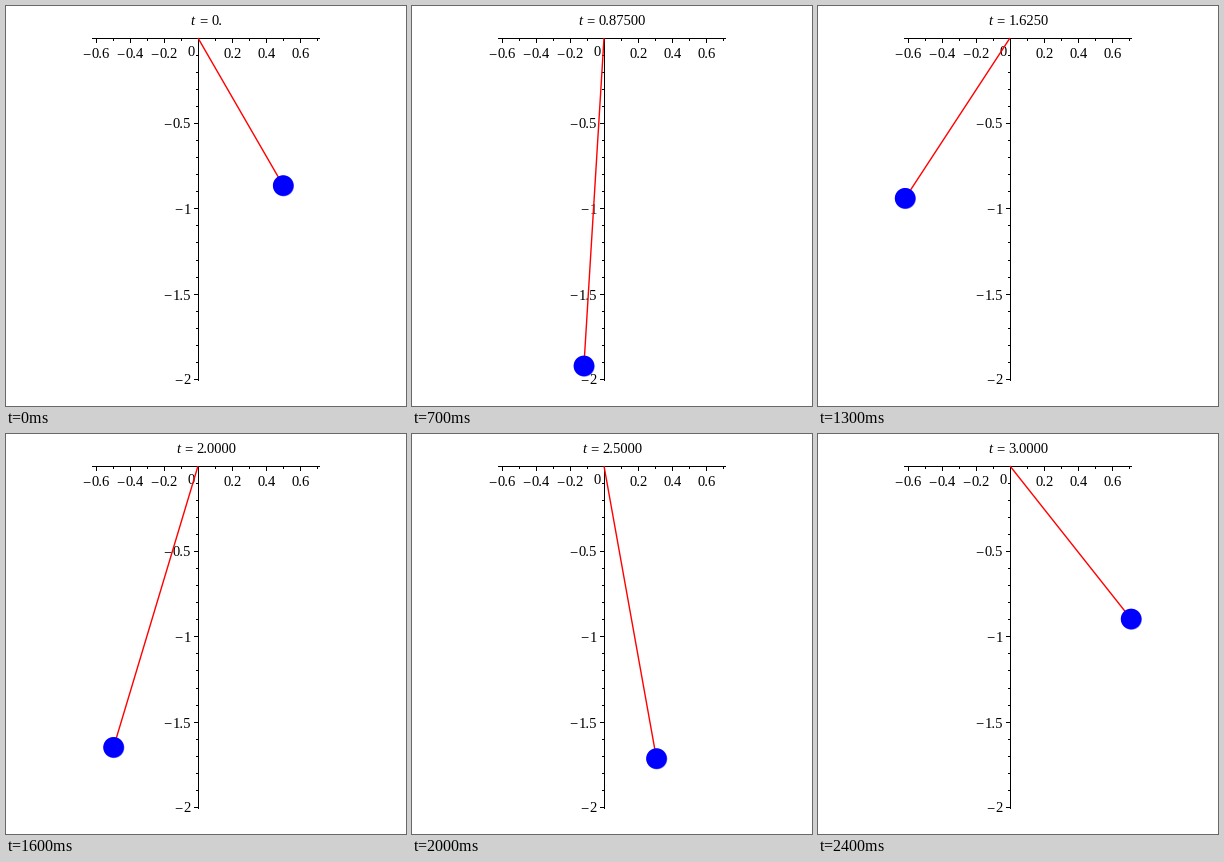
Animation, 400 px wide and 400 px high, one loop 2500 ms. Source, as a matplotlib script:

```python
import numpy as np
import matplotlib as mpl
import matplotlib.pyplot as plt
from matplotlib.animation import FuncAnimation
from matplotlib.patches import Circle

mpl.rcParams["toolbar"] = "None"
mpl.rcParams["font.family"] = "Liberation Serif"

SIZE, DPI = 400, 100
PX = 72 / DPI               # points per pixel
EM = 11 * 96 / 72           # text size in pixels
OX, OY, UNIT = 192, 32, 170.4
FRAMES, DT, SUB = 25, 0.125, 50
G, K, REST = 9.8, 20.0, 1.0
MINUS = "\u2212"


def deriv(s):
    pos, vel = s[:2], s[2:]
    pull = K * (1 - REST / np.hypot(*pos))
    return np.concatenate([vel, -pull * pos - np.array([0, G])])


def swing():
    """Bob positions of a spring pendulum released at rest, by RK4."""
    a = np.pi / 6
    s = np.array([np.sin(a), -np.cos(a), 0.0, 0.0])
    h = DT / SUB
    path = [s[:2]]
    for _ in range(FRAMES - 1):
        for _ in range(SUB):
            k1 = deriv(s)
            k2 = deriv(s + h / 2 * k1)
            k3 = deriv(s + h / 2 * k2)
            k4 = deriv(s + h * k3)
            s = s + h / 6 * (k1 + 2 * k2 + 2 * k3 + k4)
        path.append(s[:2])
    return np.array(path)


path = swing()
px = OX + UNIT * path[:, 0]
py = OY - UNIT * path[:, 1]

fig = plt.figure(figsize=(SIZE / DPI, SIZE / DPI), dpi=DPI, facecolor="white")
ax = fig.add_axes([0, 0, 1, 1])
ax.set_xlim(0, SIZE)
ax.set_ylim(SIZE, 0)
ax.axis("off")


def rule(xs, ys):
    ax.plot(xs, ys, color="black", lw=PX, solid_capstyle="butt",
            snap=False, zorder=2)


def hline(x0, x1, y):
    rule([x0, x1 + 1], [y + 0.5, y + 0.5])


def vline(x, y0, y1):
    rule([x + 0.5, x + 0.5], [y0, y1 + 1])


def label(x, y, s, **kw):
    return ax.text(x, y, s, ha="left", va="baseline", fontsize=EM * PX,
                   color="black", zorder=1, **kw)


def width(s):
    """Advance of a plain decimal: half an em per digit, a quarter per dot."""
    return EM * (len(s) - s.count(".") / 2) / 2


def tick_label(x, y, v, align):
    s = f"{abs(v):g}"
    sign = EM * 0.564 + 1 if v < 0 else 0
    left = x - align * (width(s) + sign)
    if sign:
        label(left, y, MINUS)
    label(left + sign, y, s)


# Horizontal axis
hline(round(px.min()), round(px.max()), OY)
for i in range(-6, 8):
    x = round(OX + UNIT * i / 10)
    major = i % 2 == 0
    vline(x, OY, OY + (4 if major else 2))
    if major and i:
        tick_label(x + 0.5, 52, i / 10, 0.5)
label(181, 50, "0")

# Vertical axis
vline(OX, OY, int(py.max()))
for i in range(1, 21):
    y = round(OY + UNIT * i / 10)
    major = i % 5 == 0
    hline(OX - (4 if major else 2), OX, y)
    if major:
        tick_label(185, y + 5.5, -i / 10, 1)

rod, = ax.plot([], [], color="red", lw=1.4 * PX, solid_capstyle="butt",
               zorder=3)
rim = ax.add_patch(Circle((0, 0), 10.4, fc="#8080ff", ec="none", zorder=4))
bob = ax.add_patch(Circle((0, 0), 10.3, fc="blue", ec="none", zorder=5))
var = label(0, 19, "t", style="italic")
eq = label(0, 19, "=")
val = label(0, 19, "")


def clock(t):
    if t == 0:
        return "0."
    return f"{t:.5f}" if t < 1 else f"{t:.4f}"


def update(i):
    x, y = px[i], py[i]
    rod.set_data([OX, x], [OY, y])
    bob.center = (x, y)
    rim.center = (x + 0.4, y + 0.4)
    s = clock(i * DT)
    left = 200.5 - (width(s) + 1.4 * EM) / 2
    var.set_x(left)
    eq.set_x(left + 0.556 * EM)
    val.set_x(left + 1.4 * EM)
    val.set_text(s)
    return rod, rim, bob, var, eq, val


anim = FuncAnimation(fig, update, frames=FRAMES, interval=100, repeat=True)
plt.show()
```
